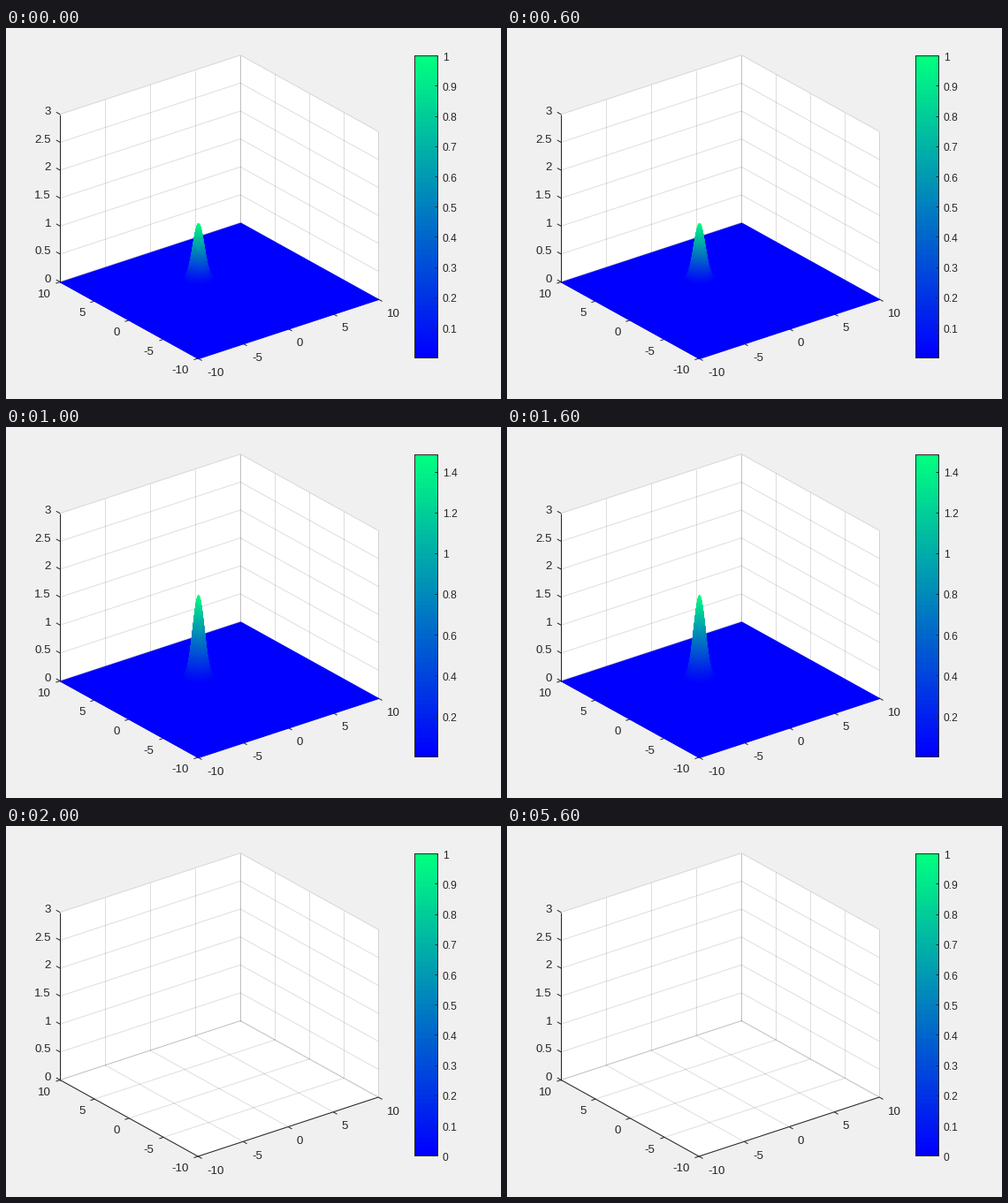
Recreate the animation shown at these times as a matplotlib script. Size 560 by 420 pixels, loop 8000 ms.

```python
import numpy as np
import matplotlib.pyplot as plt
from matplotlib.animation import FuncAnimation
from matplotlib.collections import LineCollection, PolyCollection

W, H, DPI = 560, 420, 100
PX = 72 / DPI
INK = (0.15, 0.15, 0.15)
WINTER = plt.get_cmap("winter", 64)

# Screen position of the front corner and screen step per data unit.
FRONT = np.array([217.2, 374.0])
DX = np.array([204.0, -67.0]) / 20
DY = np.array([-156.0, -86.5]) / 20
DZ = np.array([0.0, -63.25])

BAR_LEFT, BAR_RIGHT, BAR_TOP, BAR_BOTTOM = 462.2, 488.2, 31.2, 373.2

plt.rcParams["font.family"] = "Liberation Sans"
fig = plt.figure(figsize=(W / DPI, H / DPI), dpi=DPI, facecolor="#f0f0f0")
ax = fig.add_axes([0, 0, 1, 1])


def project(x, y, z=0.0):
    x, y, z = (np.asarray(v, float)[..., None] for v in (x, y, z))
    return FRONT + (x + 10) * DX + (y + 10) * DY + z * DZ


def lines(segments, zorder, alpha=1.0):
    ax.add_collection(LineCollection(segments, colors=[INK + (alpha,)],
                                     linewidths=PX, zorder=zorder))


def label(x, middle, value, size=13.33, align="left"):
    ax.text(x, middle + 0.345 * size, f"{value:g}", fontsize=size * PX,
            color=INK, ha=align, va="baseline", zorder=6)


def edge(a, b):
    return project(*np.transpose([a, b]))


def draw_box():
    walls = [
        project([-10, 10, 10, -10], [10] * 4, [0, 0, 3, 3]),
        project([10] * 4, [10, -10, -10, 10], [0, 0, 3, 3]),
        project([-10, 10, 10, -10], [-10, -10, 10, 10]),
    ]
    ax.add_collection(PolyCollection(walls, facecolors="white",
                                     edgecolors="none", zorder=1))
    grid = []
    for v in np.arange(-10, 11, 5):
        grid += [edge((v, 10, 0), (v, 10, 3)), edge((10, v, 0), (10, v, 3)),
                 edge((v, -10, 0), (v, 10, 0)), edge((-10, v, 0), (10, v, 0))]
    for z in np.arange(0, 3.1, 0.5):
        grid += [edge((-10, 10, z), (10, 10, z)), edge((10, 10, z), (10, -10, z))]
    lines(grid, 2, 0.15)


def draw_axes():
    out_x = DX / np.hypot(*DX) * 5
    out_y = DY / np.hypot(*DY) * 5
    rules = [edge((-10, 10, 0), (-10, 10, 3)), edge((-10, 10, 0), (-10, -10, 0)),
             edge((-10, -10, 0), (10, -10, 0))]
    for v in np.arange(-10, 11, 5):
        p = project(v, -10)
        rules.append([p, p - out_y])
        label(p[0] + 9.7, p[1] + 15, v)
        p = project(-10, v)
        rules.append([p, p - out_x])
        label(p[0] - 10.6, p[1] + 12.7, v, align="right")
    for z in np.arange(0, 3.1, 0.5):
        p = project(-10, 10, z)
        rules.append([p, p + out_y])
        label(p[0] - 10, p[1] - 4.2, z, align="right")
    lines(rules, 3)


def draw_surface(peak):
    floor = project([-10, 10, 10, -10], [-10, -10, 10, 10])
    ax.add_collection(PolyCollection([floor], facecolors="#0000ff",
                                     edgecolors="#0000ff", linewidths=PX, zorder=4))
    # Far cells come first, so nearer ones cover them.
    steps = np.linspace(2, -2, 81)
    x, y = np.meshgrid(steps, steps + 3, indexing="ij")
    shape = np.exp(-2 * (x**2 + (y - 3)**2))
    points = project(x, y, peak * shape)
    corners = [(slice(None, -1), slice(None, -1)), (slice(1, None), slice(None, -1)),
               (slice(1, None), slice(1, None)), (slice(None, -1), slice(1, None))]
    quads = np.stack([points[c] for c in corners], axis=2).reshape(-1, 4, 2)
    level = np.mean([shape[c] for c in corners], axis=0).ravel()
    colors = WINTER(level)
    ax.add_collection(PolyCollection(quads, facecolors=colors, edgecolors=colors,
                                     linewidths=0.3 * PX, zorder=5))


def draw_colorbar(top, ticks):
    ax.pcolormesh([BAR_LEFT, BAR_RIGHT], np.linspace(BAR_BOTTOM, BAR_TOP, 65),
                  np.arange(64)[:, None], cmap=WINTER, zorder=2)
    rules = [[(BAR_LEFT, BAR_TOP), (BAR_RIGHT, BAR_TOP), (BAR_RIGHT, BAR_BOTTOM),
              (BAR_LEFT, BAR_BOTTOM), (BAR_LEFT, BAR_TOP)]]
    for value in ticks:
        y = BAR_BOTTOM + (BAR_TOP - BAR_BOTTOM) * value / top
        rules.append([(BAR_RIGHT - 3.4, y), (BAR_RIGHT, y)])
        label(493.9, y + 1.4, value, size=12)
    lines(rules, 3)


def draw(second):
    ax.clear()
    ax.set(xlim=(0, W), ylim=(H, 0))
    ax.axis("off")
    draw_box()
    draw_axes()
    if second == 0:
        draw_surface(1.0)
        draw_colorbar(1.0, np.arange(1, 11) / 10)
    elif second == 1:
        draw_surface(1.485)
        draw_colorbar(1.485, np.arange(1, 8) / 5)
    else:
        draw_colorbar(1.0, np.arange(11) / 10)
    return ax.get_children()


anim = FuncAnimation(fig, draw, frames=8, interval=1000, repeat=True,
                     repeat_delay=0, init_func=lambda: draw(0))
plt.show()
```
